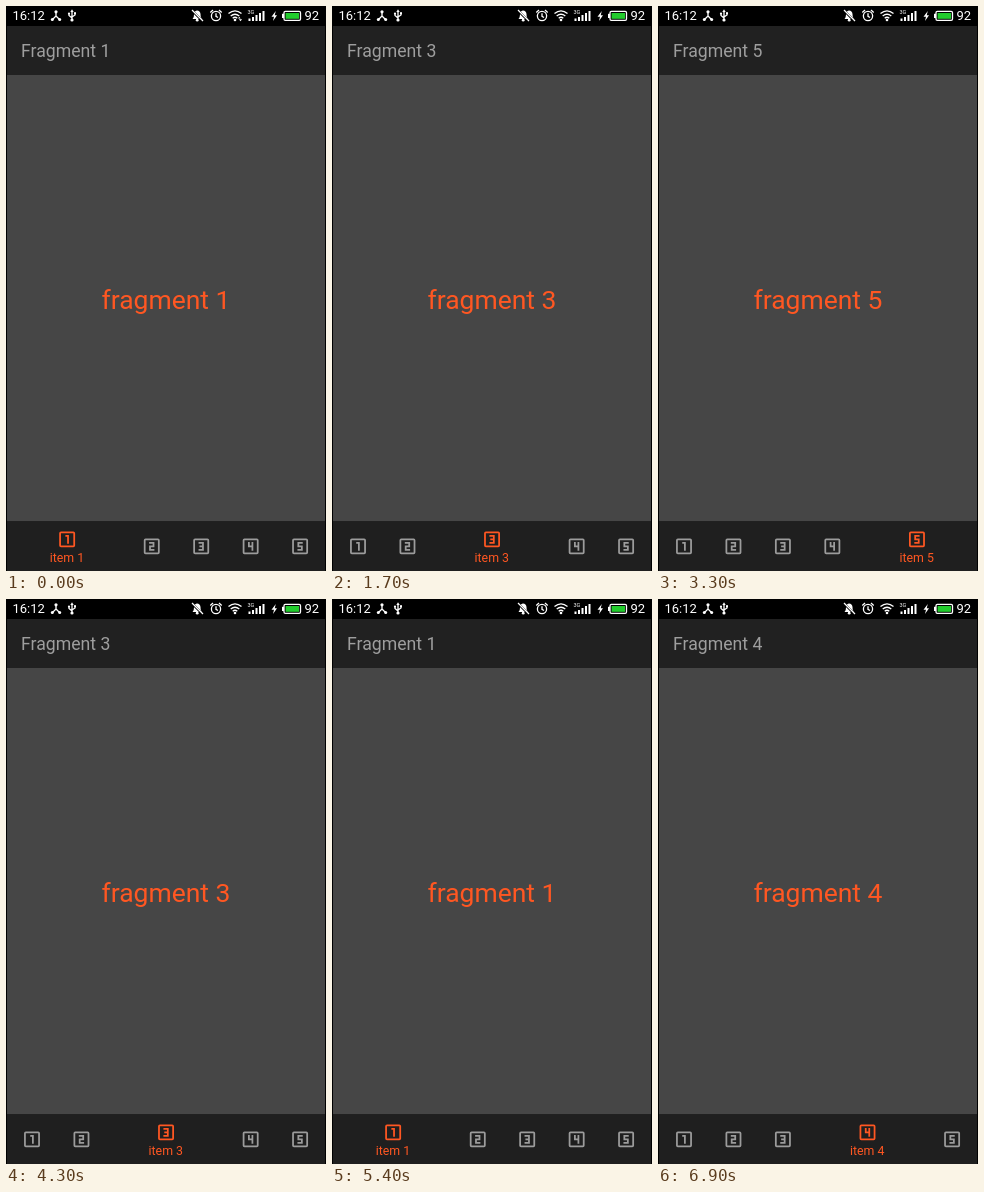
Animation of 320x565 px, one loop 7000 ms. Source, as an HTML page:

```html
<!DOCTYPE html>
<html lang="en">
<head>
<meta charset="utf-8">
<title>Bottom navigation</title>
<style>
  html, body { margin: 0; width: 100%; height: 100%; overflow: hidden; background: #000; }
  svg { display: block; width: 100%; height: 100%; font-family: Roboto, sans-serif; }
  .status { font-size: 13px; fill: #fff; }
  .line { fill: none; stroke: #fff; stroke-width: 1.3; }
  .item { fill: none; stroke: #9c9c9c; stroke-width: 2; }
  .item.on { stroke: #ff5722; }
  .label { font-size: 12.36px; fill: #ff5722; stroke: none; text-anchor: middle; }
  #title { font-size: 17.66px; fill: #9e9e9e; }
  #content { font-size: 26.5px; fill: #ff5722; text-anchor: middle; }
</style>
</head>
<body>
<svg viewBox="0 0 320 565">
  <rect width="320" height="565"/>
  <rect x="1" y="20" width="318" height="49" fill="#212121"/>
  <rect x="1" y="69" width="318" height="446.5" fill="#464646"/>
  <rect x="1" y="515.5" width="318" height="49.5" fill="#1f1f1f"/>

  <g class="status">
    <text x="6.5" y="14.2">16:12</text>
    <!-- debug and usb -->
    <path class="line" d="M50 5V10L46 14M50 10L54 14"/>
    <circle cx="50" cy="5.8" r="1.6"/><circle cx="46.3" cy="13.6" r="1.5"/><circle cx="53.7" cy="13.6" r="1.5"/>
    <path class="line" stroke-width="1" d="M66 5V14M63 7.5V9.5L66 12M69 7V9L66 11"/>
    <path d="M64.3 6L66 3.3L67.7 6Z"/><circle cx="66" cy="14" r="1.6"/>
    <circle cx="63" cy="7.6" r="1.1"/><rect x="68" y="6.2" width="2" height="2"/>
    <!-- muted bell -->
    <path d="M186.5 13C188 11.5 187.8 10 188 8C188.4 5.5 190 4.8 191 4.6C193 4.8 194.3 6 194.5 8C194.6 10 194.6 11.5 196 13Z"/>
    <circle cx="191.2" cy="14.2" r="1.4"/>
    <path d="M185.5 4L197 15.5" stroke="#000" stroke-width="2.4"/>
    <path class="line" d="M186 4L197 15"/>
    <!-- alarm clock -->
    <circle class="line" cx="210" cy="10" r="4.6"/>
    <path class="line" d="M210 7.2V10.3L212 11.5M204.3 6.5L207 4M215.7 6.5L213 4"/>
    <!-- wifi -->
    <path class="line" d="M222.5 7.6Q229 2.2 235.5 7.6M224.7 10Q229 6.5 233.3 10M226.7 12.3Q229 10.3 231.3 12.3"/>
    <circle cx="229" cy="14" r="1.3"/>
    <path id="traffic" d="M232 12.5L233.3 10.7L234.6 12.5ZM232.9 13.2H236.1L234.5 15.3Z"/>
    <!-- signal -->
    <text x="241.5" y="8" font-size="5.5">3G</text>
    <path d="M242.5 12.5h2v2.5h-2zM246 11h2v4h-2zM249.5 9h2v6h-2zM253 7h2v8h-2zM256.5 5h2v10h-2z"/>
    <!-- battery -->
    <path d="M269.8 5L265.5 10.7H268L267 15L271 9.2H268.7Z"/>
    <rect class="line" x="278" y="5.4" width="16.5" height="9" rx="1.3"/>
    <rect x="276" y="7.8" width="2" height="4.2"/>
    <rect x="279.6" y="7" width="13.4" height="5.8" fill="#22cc2d"/>
    <text x="298.5" y="14.2">92</text>
  </g>

  <text id="title" x="15" y="51"></text>
  <text id="content" x="160" y="302.5"></text>
  <g id="bar"></g>
</svg>

<script>
const LOOP = 7000, TICK = 100, PITCH = 49.45, EXTRA = 35.15;
const DIGITS = [
  'M10 8H13V17',
  'M9 8H14V12H10V16H15',
  'M9 8H14V16H9M10 12H14',
  'M10 7V12H14M14 7V17',
  'M15 8H10V12H14V16H9'
];
// Progress shown on each tick of a switch, by its number of ticks
const EASE = { 1: [1], 2: [0.5, 1], 3: [0.06, 0.72, 1] };
// [start ms, selected item, ticks]
const SWITCHES = [
  [0, 0, 1], [1000, 1, 3], [1500, 2, 3], [2000, 3, 3], [2600, 4, 2], [3500, 3, 2],
  [4200, 2, 2], [4800, 1, 2], [5300, 0, 2], [6000, 2, 2], [6800, 3, 2]
];

const byId = id => document.getElementById(id);
const title = byId('title'), content = byId('content'), traffic = byId('traffic'), bar = byId('bar');

bar.innerHTML = DIGITS.map((digit, i) => `
  <g class="item">
    <g><rect x="4" y="4" width="16" height="16" rx="1"/><path d="${digit}"/></g>
    <text class="label">item ${i + 1}</text>
  </g>`).join('');
const items = [...bar.children];

const mix = (a, b, p) => a + (b - a) * p;
const centre = (i, selected) => 26 + PITCH * i + EXTRA * (1 + Math.sign(i - selected));

function draw(time) {
  const index = SWITCHES.findLastIndex(([start]) => start <= time);
  const [start, current, ticks] = SWITCHES[index];
  const previous = index ? SWITCHES[index - 1][1] : current;
  const tick = Math.min(ticks - 1, Math.floor((time - start) / TICK));
  const progress = EASE[ticks][tick];

  title.textContent = `Fragment ${current + 1}`;
  content.textContent = `fragment ${current + 1}`;
  traffic.style.display = time < 900 ? '' : 'none';

  items.forEach((item, i) => {
    const [icon, label] = item.children;
    const x = mix(centre(i, previous), centre(i, current), progress);
    const active = mix(+(i === previous), +(i === current), progress);
    item.classList.toggle('on', i === current);
    icon.setAttribute('transform', `translate(${x} ${540.4 - 7 * active}) scale(.883) translate(-12 -12)`);
    label.setAttribute('transform', `translate(${x - 0.3} 556.2) scale(${0.5 + 0.5 * active})`);
    label.setAttribute('opacity', active);
  });
}

function frame() {
  draw(performance.now() % LOOP);
  requestAnimationFrame(frame);
}
frame();
</script>
</body>
</html>
```
